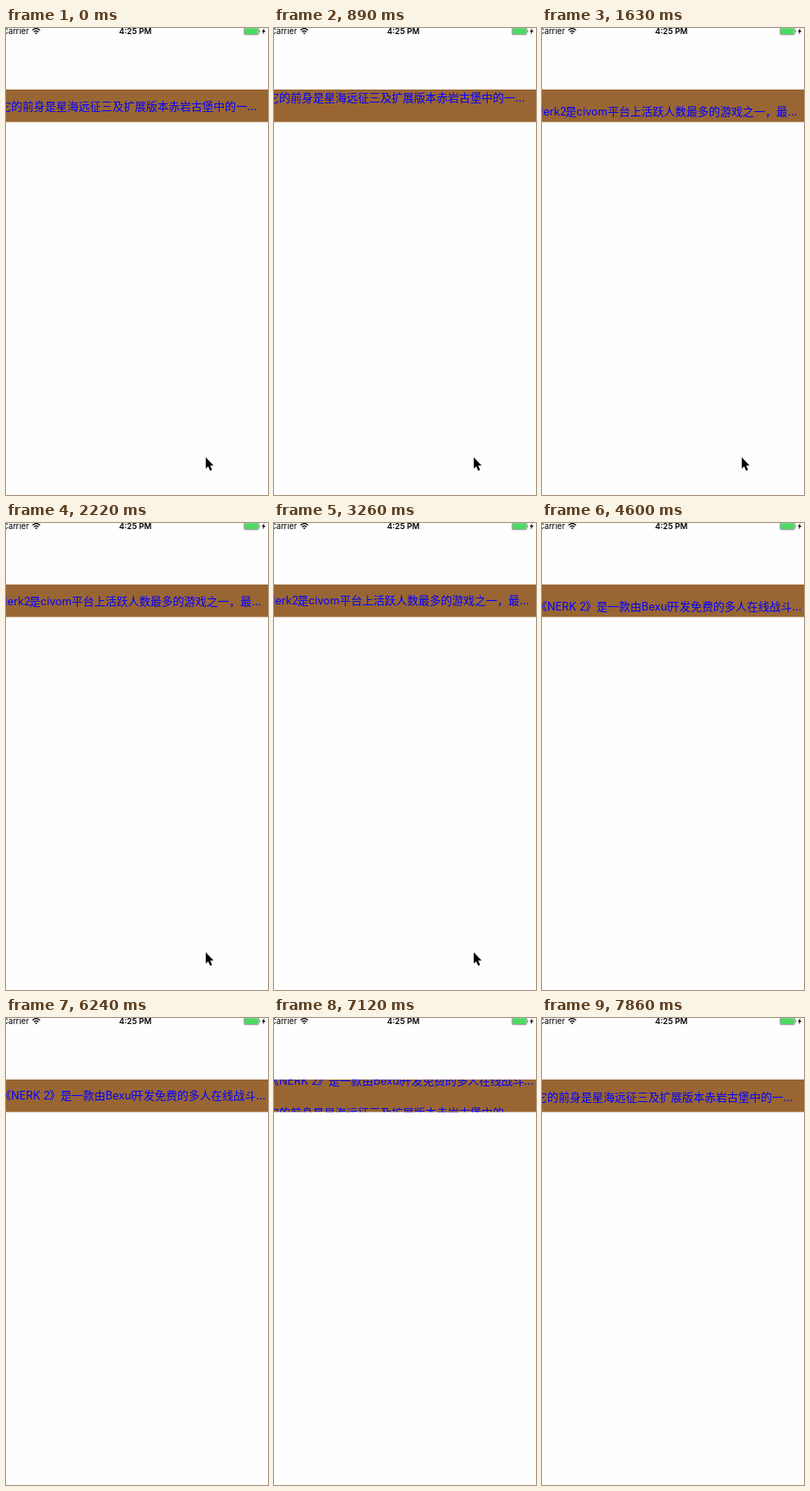
These frames come from a looping animation (303 by 539 pixels, 8 s). An HTML page:

```html
<!DOCTYPE html>
<html lang="zh-CN">
<head>
<meta charset="utf-8">
<title>Vertical ticker</title>
<style>
  html, body { margin: 0; width: 100%; height: 100%; overflow: hidden; background: #fefefe; }
  svg { display: block; width: 100vw; height: 100vh; }
  text { white-space: pre; }
  .line { fill: #00f; font: 13px "Noto Sans CJK SC", "Noto Sans CJK", sans-serif; }
  .line .latin { font: 12.6px Inter, "Liberation Sans", sans-serif; }
  .line .dots { font: 13px Inter, "Liberation Sans", sans-serif; }
  .status { fill: #000; font: 9.4px Inter, "Liberation Sans", sans-serif; }
  .clock { font-weight: 600; font-size: 9.3px; }
</style>
</head>
<body>
<svg viewBox="0 0 303 539" preserveAspectRatio="none">
  <defs><clipPath id="clip"><rect y="71" width="303" height="37.5"/></clipPath></defs>

  <g class="status">
    <text x="26.5" y="7.2" text-anchor="end">Carrier</text>
    <text class="clock" x="149.5" y="7.2" text-anchor="middle">4:25 PM</text>
    <g fill="none" stroke="#000" stroke-width="1.3">
      <path d="M30.6 2.5Q35 -1.3 39.4 2.5"/>
      <path d="M32.4 4.4Q35 2.2 37.6 4.4"/>
    </g>
    <path d="M33.6 5.7Q35 4.7 36.4 5.7L35 7.2Z"/>
    <rect x="275.3" y="-0.3" width="17" height="8" rx="1.6" fill="#fff" stroke="#444" stroke-width=".6"/>
    <rect x="275.9" y=".3" width="15.8" height="6.8" rx="1" fill="#4cd964"/>
    <path d="M293 2.4Q294.4 3.7 293 5Z"/>
    <path d="M298.8 0L295.8 4.2H297.6L296.8 7.4L300 3H298.1Z"/>
  </g>

  <rect y="71" width="303" height="37.5" fill="#963"/>
  <g id="bar" clip-path="url(#clip)"></g>

  <path id="cursor" d="M231 495.4V508.6L233.9 505.9L236.1 511L238.3 510L236.2 505.1H240Z"
        stroke="#fff" stroke-width="1.2" paint-order="stroke" stroke-linejoin="round"/>
</svg>
<script>
const LOOP = 8000, ROW = 37.5;
const FIRST = 190, PERIOD = 2975, SLIDE = 2000;   // ticker timing, ms
const TICK_FROM = 290, TICK = 148.2;              // the picture refreshes in ticks

// each piece: x, text, style
const LINES = [
  [[-7, "它的前身是星海远征三及扩展版本赤岩古堡中的一"], [279, "…", "dots"]],
  [[-8, "Nerk2", "latin"], [27, "是"], [40, "civom", "latin"],
   [76, "平台上活跃人数最多的游戏之一，最"], [284, "…", "dots"]],
  [[-7, "《"], [6, "NERK 2", "latin"], [50, "》是一款由"], [115, "Bexul", "latin"],
   [146, "开发免费的多人在线战斗"], [289, "…", "dots"]]
];

const make = (tag, attrs, parent) => {
  const el = document.createElementNS("http://www.w3.org/2000/svg", tag);
  for (const key in attrs) el.setAttribute(key, attrs[key]);
  return parent.appendChild(el);
};

const bar = document.getElementById("bar");
const cursor = document.getElementById("cursor");
const rows = LINES.map(pieces => {
  const row = make("g", { class: "line" }, bar);
  for (const [x, str, style = ""] of pieces)
    make("text", { x, y: 94.6, class: style }, row).textContent = str;
  return row;
});

const clamp = v => Math.min(1, Math.max(0, v));

// cubic-bezier(.42, 0, .58, 1)
function ease(x) {
  let lo = 0, hi = 1, u = x;
  for (let i = 0; i < 24; i++) {
    u = (lo + hi) / 2;
    const bx = 1.26 * u * (1 - u) ** 2 + 1.74 * u * u * (1 - u) + u ** 3;
    if (bx < x) lo = u; else hi = u;
  }
  return u * u * (3 - 2 * u);
}

function place(row, y) {
  row.setAttribute("visibility", Math.abs(y) < ROW ? "visible" : "hidden");
  row.setAttribute("transform", `translate(0 ${y})`);
}

function draw(time) {
  const tick = Math.floor((time - TICK_FROM) / TICK);
  const t = tick < 0 ? 0 : 300 + tick * TICK;

  const turn = Math.max(0, Math.floor((t - FIRST) / PERIOD));
  const part = clamp((t - FIRST - turn * PERIOD) / SLIDE);
  const p = part === 1 ? 1 : part === 0 ? 0 : ease(part);
  const out = turn % 3, next = (turn + 1) % 3;
  rows.forEach((row, i) =>
    place(row, i === out ? -p * ROW : i === next ? (1 - p) * ROW : ROW));

  const drop = Math.max(0, (t - 4005) * 0.105);
  cursor.setAttribute("transform", `translate(0 ${drop})`);
  cursor.setAttribute("visibility", drop < 45 ? "visible" : "hidden");
}

const start = performance.now();
function frame() {
  draw((performance.now() - start) % LOOP);
  requestAnimationFrame(frame);
}
frame();
</script>
</body>
</html>
```
